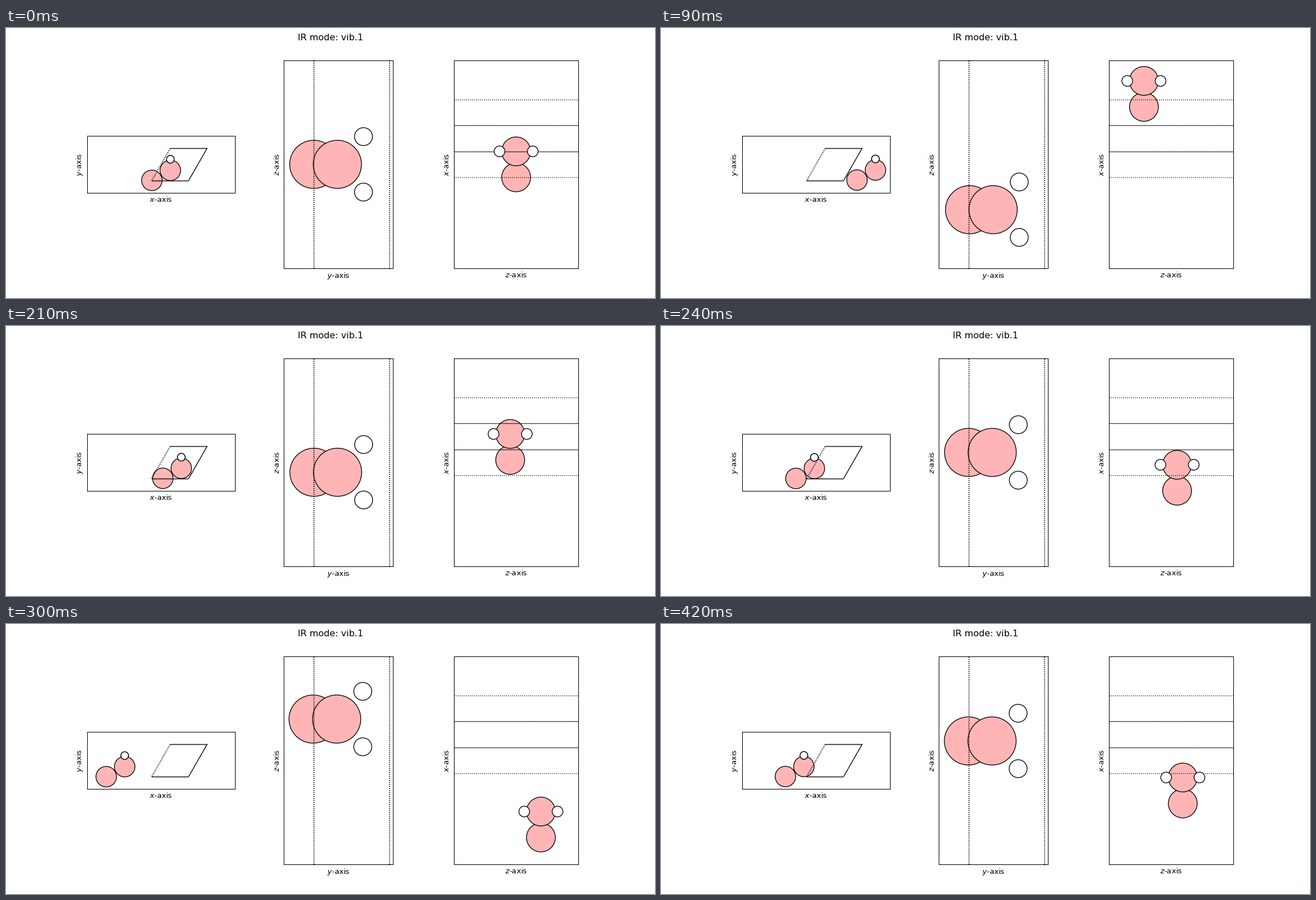
Animation, 1159 px wide and 483 px high, one loop 0.45 s. Source, as a matplotlib script:

```python
import numpy as np
import matplotlib.pyplot as plt
from matplotlib.animation import FuncAnimation
from matplotlib.patches import Circle

W, H, DPI = 1159, 483, 96.6
FRAMES = 15
PINK = (1.0, 0.71, 0.71)

# Lengths are in units of the large atom's radius.
ATOMS = [  # x, y, z, radius, colour, zorder
    (0.0, 0.0, 0.0, 1.0, PINK, 2),
    (1.8, 0.977, 0.0, 1.0, PINK, 3),
    (1.8, 2.06, -1.152, 0.372, "white", 5),
    (1.8, 2.06, 1.152, 0.372, "white", 5),
]
MODE = np.array([5.138, 0.034, -1.981])
CELL_A, CELL_SKEW, CELL_H = 3.595, 1.8, 3.147

X_LIM, Z_LIM = (-6.31, 8.11), (-4.32, 4.32)
VIEWS = [  # axes shown across and up, with their limits
    (0, 1, X_LIM, (-1.225, 4.355)),
    (1, 2, (-1.236, 3.294), Z_LIM),
    (2, 0, Z_LIM, X_LIM),
]

plt.rcParams["font.family"] = "DejaVu Sans"
# The small margin keeps rounding from losing a pixel.
fig, axes = plt.subplots(1, 3, dpi=DPI, facecolor="white",
                         figsize=((W + 0.01) / DPI, (H + 0.01) / DPI))
fig.suptitle("IR mode: vib.1", size=12)


def dotted(ax, p, q, lw=1.0, phase=0.0):
    dots = (phase / lw, (1 / lw, 1.65 / lw))
    ax.plot([p[0], q[0]], [p[1], q[1]], color="black", lw=lw,
            ls=dots, dash_capstyle="butt", zorder=4)


def dense(ax, p, q):
    dotted(ax, p, q)
    dotted(ax, p, q, phase=1.3)


def cell_top(ax):
    p0, p1 = (0, 0), (CELL_A, 0)
    p2, p3 = (CELL_A + CELL_SKEW, CELL_H), (CELL_SKEW, CELL_H)
    for _ in range(2):  # lower and upper face coincide
        dotted(ax, p0, p3)
        for p, q in ((p0, p1), (p1, p2), (p3, p2)):
            dense(ax, p, q)


def cell_side(ax):
    for y in (0, CELL_H):
        dotted(ax, (y, Z_LIM[0]), (y, Z_LIM[1]), lw=1.5)


def cell_front(ax):
    for i in range(4):
        x = i * CELL_A / 2
        line = dense if i in (1, 2) else dotted
        line(ax, (Z_LIM[1], x), (Z_LIM[0], x))


balls = []
for ax, view, draw_cell in zip(axes, VIEWS, (cell_top, cell_side, cell_front)):
    across, up, xlim, ylim = view
    draw_cell(ax)
    for *pos, r, colour, z in ATOMS:
        ball = Circle((0, 0), r, fc=colour, ec="black", lw=1, zorder=z)
        ax.add_patch(ball)
        balls.append((ball, np.array(pos), [across, up]))
    ax.set(xlim=xlim, ylim=ylim, aspect="equal", xticks=[], yticks=[])
    ax.set_xlim(xlim)
    ax.set_ylim(ylim)
    ax.set_xlabel(f"${'xyz'[across]}$-axis")
    ax.set_ylabel(f"${'xyz'[up]}$-axis")


def update(k):
    shift = MODE * np.sin(2 * np.pi * k / FRAMES)
    for ball, pos, shown in balls:
        ball.center = tuple((pos + shift)[shown])
    return [b[0] for b in balls]


anim = FuncAnimation(fig, update, frames=FRAMES, interval=30,
                     repeat=True, repeat_delay=0, blit=False)
plt.show()
```
